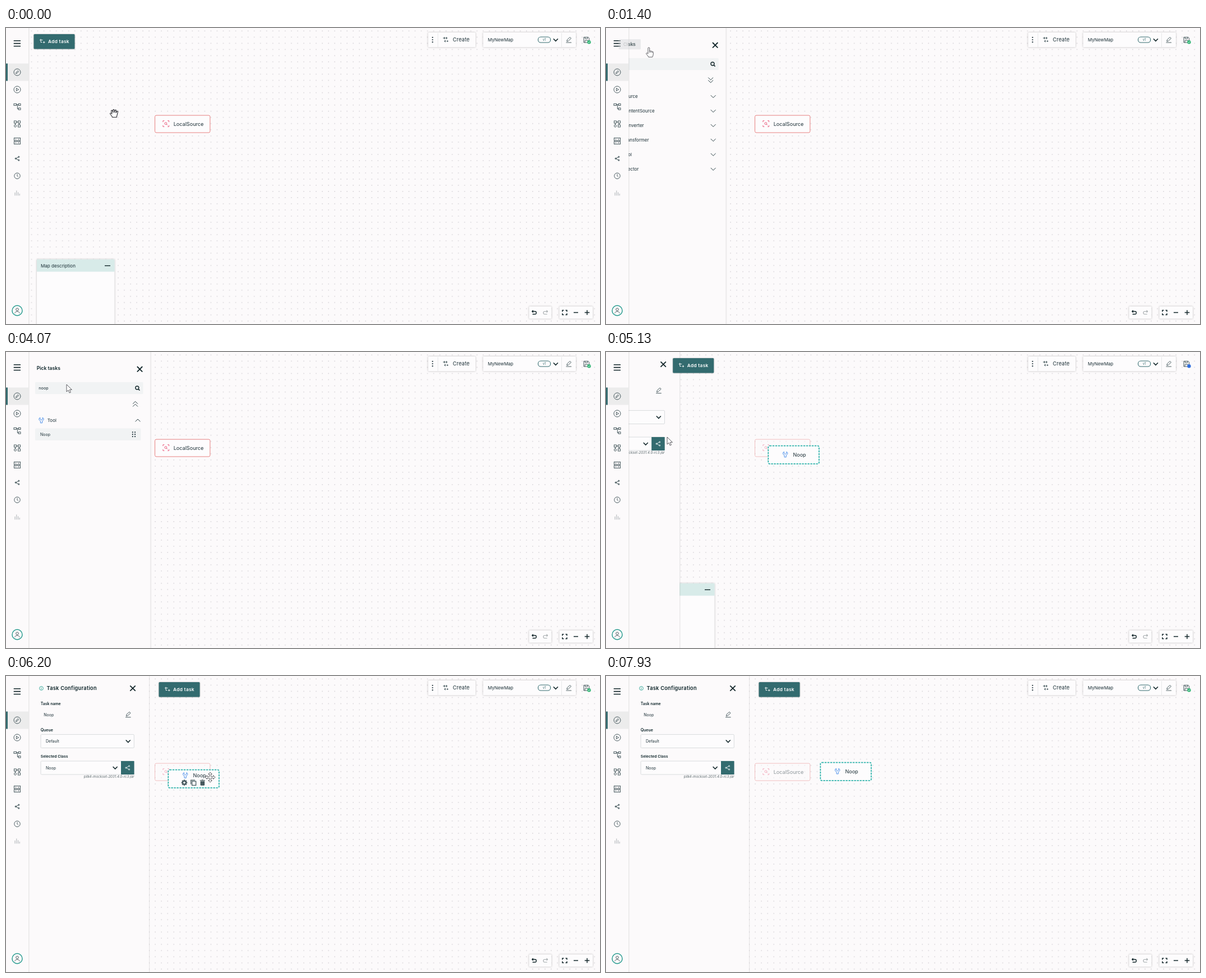
Animation, 1059 px wide and 529 px high, one loop 8000 ms. Source, as an HTML page:

```html
<!DOCTYPE html>
<html lang="en">
<head>
<meta charset="utf-8">
<title>Map editor</title>
<style>
html,body{margin:0;width:100%;height:100%;overflow:hidden;background:#fcfafb}
svg{display:block;width:100%;height:100%}
text{font-family:Inter,"Open Sans",sans-serif;fill:#1b2f36;white-space:pre}
.b{font-weight:600;fill:#0d2429}
.w{fill:#fff}
.l{fill:none;stroke:#2b4046;stroke-width:.85}
.k{fill:none;stroke:#12262a;stroke-width:1.6}
.card{fill:#fdfcfd;filter:drop-shadow(0 .8px 1.4px rgba(0,0,0,.28))}
.side{fill:#fcfafb;filter:drop-shadow(.6px 0 1px rgba(0,0,0,.25))}
.cur{fill:#fff;stroke:#2a2a30;stroke-width:.75;stroke-linejoin:round}
</style>
</head>
<body>
<svg id="stage" viewBox="0 0 1059 529" xmlns="http://www.w3.org/2000/svg"></svg>
<script>
const stage = document.getElementById('stage');
const $ = id => document.getElementById(id);
const path = (d, cls = 'l', extra = '') => `<path class="${cls}" d="${d}" ${extra}/>`;
const label = (x, y, size, s, cls = '', extra = '') =>
  `<text x="${x}" y="${y}" font-size="${size}" class="${cls}" ${extra}>${s}</text>`;
const rect = (x, y, w, h, extra = '') => `<rect x="${x}" y="${y}" width="${w}" height="${h}" ${extra}/>`;
const circle = (x, y, r, extra = 'class="l"') => `<circle cx="${x}" cy="${y}" r="${r}" ${extra}/>`;
const at = (x, y, body, extra = '') => `<g transform="translate(${x} ${y})" ${extra}>${body}</g>`;
const group = (id, body) => `<g id="${id}">${body}</g>`;
const dots = (x, ys, r = 1.1) => ys.map(y => circle(x, y, r, 'fill="#1b2f36"')).join('');
const ink = (color, w = .9) => `style="stroke:${color};stroke-width:${w}"`;
const fill = (color, extra = '') => `fill="${color}" ${extra}`;

const pencil = path('M-3.6 3 -3-.1 2-4.6 4-2.5-1 2.2ZM-5 5H4.6', 'l', ink('#2b4046', .85));
const cross = path('M-4.7-4.7 4.7 4.7M4.7-4.7-4.7 4.7', 'k', 'style="stroke-width:1.8"');
const chevron = path('M-4-2 0 2 4-2', 'k');
const thin = dir => path(`M-4.4 ${-2.1 * dir} 0 ${2.3 * dir} 4.4 ${-2.1 * dir}`, 'l', ink('#20363c', .95));
const share = color => path('M2.6-3-2.6 0 2.6 3', 'l', ink(color)) +
  [[2.8, -3], [-2.8, 0], [2.8, 3]].map(p => circle(...p, 1.1, fill('none', ink(color)))).join('');
const addIcon = color => path('M-4.5-2.5H1M-2.5-4.5V1.5H0M1.5 1.5H5M3.2-.3V3.4', 'l', ink(color));

const icons = {
  Source: path('M-5.3-2.8V-5.3H-2.8M2.8-5.3H5.3V-2.8M5.3 2.8V5.3H2.8M-2.8 5.3H-5.3V2.8M1.1 1.1 2.8 2.8', 'l', ink('#e8486f')) +
    circle(-.4, -.4, 1.9, `fill="none" ${ink('#e8486f')}`),
  ContentSource: path('M-5-3V5H4.5V1.5M-3 2C-2-1.5 0-2.5 4.6-2.6M2.6-4.8 4.8-2.6 2.6-.5', 'l', ink('#ee6585')),
  Converter: path('M-4.6-4.6H.6V-1.4H-1.2V4.6H-4.6Z', '', fill('#d9822b')) + path('M.2.2H2.6L4.2 1.8V4.6H.2Z', 'l', ink('#d9a06a')),
  Transformer: path('M-4.6-4.8H.8V-2.2L-1.6.4V4.6H-4.6Z', '', fill('#2f7f93')) + circle(1.6, 2, 2.6, `fill="none" ${ink('#6fa5b4')}`),
  Tool: path('M-2.2-4.8C-5-3.5-5 0-1.6 1.2V4.8H1.6V1.2C5 0 5-3.5 2.2-4.8V-1.8L0-.6-2.2-1.8Z', 'l', ink('#3d86e8')),
  Injector: path('M-5-2.5V5H5V-.5M-4.2-4.8C0-4.8 1.6-2.5 1.6 2M-.7-.1 1.6 2.3 3.8-.1', 'l', ink('#2fb574', 1))
};

function sidebar() {
  const box = (x, y, w = 4, h = w) => rect(x, y, w, h, 'class="l"');
  return rect(-3, -3, 43.3, 535, 'class="side"') +
    rect(0, 63.5, 40, 31, fill('#ececec')) + rect(0, 63.5, 3, 31, fill('#336b6f')) +
    path('M13.7 22.7H26M13.7 27.6H26M13.7 32.5H26', 'k') +
    at(20, 79, circle(0, 0, 6) + path('M-2.5 2.5-2 .6 1.4-2.7 2.7-1.4-.6 2Z')) +
    at(20, 110, circle(0, 0, 6) + path('M-1.6-2.6V2.6L2.6 0Z')) +
    at(20, 140.5, box(-6, -5.2, 4.6, 3.2) + box(2.2, -5.2, 3.8, 3.2) + box(2.2, 2.4, 3.8, 3.2) + path('M-1.4-3.6H2.2M.4-3.6V4H2.2')) +
    at(20, 171.5, box(-5.5, -5.5) + box(1.5, -5.5) + box(1.5, 1.5) + circle(-3.5, 3.5, 2) + path('M-1.5-3.5H1.5M3.5-1.5V1.5M-3.5-1.5V1.5')) +
    at(20, 202, box(-5.6, -5.5, 11.2, 4.7) + box(-5.6, .8, 11.2, 4.7) + path('M-3.5-3.1H-1.5M1-3.1H3.5M-3.5 3.1H-1.5M1 3.1H3.5')) +
    at(20, 233.3, share('#2b4046')) +
    at(20, 264.3, circle(0, 0, 5.2) + path('M0-3.2V0L1.8 2')) +
    at(20, 295, path('M-4 4.5V-1M-1.2 4.5V-4.5M1.6 4.5V-1.5M4.2 4.5V1', 'l', ink('#a3abae'))) +
    at(20, 505, circle(0, 0, 9, fill('#fcfafb', ink('#23998c', 1.4))) + circle(0, -2, 2.3) + path('M-4.2 4.8C-4 .6 4 .6 4.2 4.8'));
}

function toolbars() {
  const card = (x, y, w, h) => rect(x, y, w, h, 'rx="1.5" class="card"');
  const rule = x => path(`M${x} 9V34`, 'l', ink('#e3e4e5', .8));
  return card(752.5, 8, 84.5, 26.3) + dots(760.5, [16.8, 21, 25.2]) + rule(770) +
    at(783.5, 21, path('M-4.5-3H3.5M-2-5V-1M2-5V-1M-2.5 2.5H.5M-.5.2V4.5M2 2.5H5M3.5 1V4')) +
    label(796.5, 24.4, 9.2, 'Create', '', 'letter-spacing=".2"') +
    card(850.5, 8, 165.5, 26.3) + label(859, 24, 8, 'MyNewMap') +
    rect(948.7, 16, 22, 10, `rx="4.6" fill="#fdfcfd" ${ink('#336b6f', 1.1)}`) +
    label(959.7, 23, 5.6, 'v1', '', 'text-anchor="middle" style="fill:#336b6f"') +
    at(980, 21.3, chevron) + rule(990.5) + at(1003.5, 21, pencil) +
    at(1034.8, 21.2, path('M-4.8-4.8H3L4.8-3V4.8H-4.8ZM-2.5-4.8V-2H2V-4.8M-2.7 4.8V1H2.7V4.8')) +
    circle(1039.5, 25.2, 3.2, 'id="badge"') + path('M1037.9 25.2 1039.1 26.4 1041.1 24.1', 'l', `id="check" ${ink('#fff')}`) +
    card(932.5, 497.5, 40, 22) + card(986.5, 497.5, 59.5, 22) +
    at(941.5, 508.5, path('M-1.6-4-3.6-2-1.6 0M-3.4-2H1.5A2.5 2.5 0 0 1 1.5 3H-2.8', 'k', 'style="stroke-width:1.3"')) +
    at(962, 508.5, path('M1.6-4 3.6-2 1.6 0M3.4-2H-1.5A2.5 2.5 0 0 0-1.5 3H2.8', 'l', ink('#a6acaf', 1.1))) +
    at(996, 508.5, path('M-4-1.5V-4H-1.5M1.5-4H4V-1.5M4 1.5V4H1.5M-1.5 4H-4V1.5', 'k', 'style="stroke-width:1.5"')) +
    path('M1012 508.5H1020M1031.7 508.5H1040.3M1036 504.2V512.8', 'k', 'style="stroke-width:1.5"');
}

const mapNote = rect(55, 413.5, 138.5, 125, 'class="card"') + rect(55, 413.5, 138.5, 22, fill('#d8ebe9')) +
  label(62, 427.7, 8.1, 'Map description') + path('M176 424.8H186', 'k', 'style="stroke-width:1.4"');

const addTask = rect(0, 0, 73, 26.5, 'rx="1.5" fill="#336b6f" style="filter:drop-shadow(0 .8px 1px rgba(0,0,0,.3))"') +
  at(15, 13, addIcon('#fff')) + label(25.6, 16.2, 8.2, 'Add task', 'b', 'letter-spacing=".35" style="fill:#fff"');

const localNode = rect(265.5, 156.1, 98.3, 30.9, `rx="2.5" fill="#fdfcfd" ${ink('#e57373', .9)}`) +
  at(285.2, 171, icons.Source) + label(298.7, 175, 9.1, 'LocalSource');

const gear = [0, 45, 90, 135].map(a => rect(-1.1, -5.3, 2.2, 10.6, `fill="#46595d" transform="rotate(${a})"`)).join('') +
  circle(0, 0, 2.9, fill('#fff', ink('#46595d', 2.2)));
const nodeTools = at(28.6, 23, gear) +
  at(44.8, 23, path('M-4.5 3V-4.5H3M-2.5-2.5H4.5V4.7H-2.5Z', 'l', ink('#46595d', 1.3))) +
  at(61, 23, path('M-4.5-4.7H-1.5L-1-5.4H1L1.5-4.7H4.5V-3.3H-4.5ZM-3.8-2.5H3.8V4.2L3 5.2H-3L-3.8 4.2Z', '', fill('#46595d')));
const noopNode = rect(0, 0, 90.5, 32.3, `rx="2.5" fill="#fdfcfd" ${ink('#2fb3ab', 1.8)} stroke-dasharray="3.4 1.6"`) +
  group('face', at(30.3, 15.5, icons.Tool) + label(44.2, 19.6, 9, 'Noop')) + group('tools', nodeTools);

const pickPanel = rect(30, -3, 227.5, 535, 'class="side"') +
  label(54.7, 32, 8.6, 'Pick tasks', 'b') + at(238.5, 30.7, cross) +
  rect(52, 53.7, 192.5, 21.5, 'rx="1.5" fill="#f1f3f4"') +
  circle(233.8, 64, 3, 'class="k" style="stroke-width:1.4"') + path('M236 66.2 238.4 68.6', 'k') +
  '<text id="query" x="58.3" y="67.2" font-size="7.3"></text>' +
  rect(0, 60, .8, 9, 'id="caret" fill="#12262a"') + group('list', '');

const select = (y, s) => rect(62, y, 166.3, 24, `rx="1.5" fill="#fdfcfd" ${ink('#d9dcde', 1)}`) + label(71, y + 14.6, 7, s);
const configPanel = rect(-190, -3, 445, 535, 'class="side"') +
  circle(63, 22, 3.4, `fill="none" ${ink('#2fa596')}`) + path('M63 21.4V24M63 19.8V20.6', 'l', ink('#2fa596')) +
  label(72.5, 25.3, 9.2, 'Task Configuration', 'b', 'letter-spacing=".28"') + at(226, 22, cross) +
  label(61.8, 52.2, 6.9, 'Task name', 'b') + label(67.3, 72, 7, 'Noop') + at(218, 68.7, pencil) +
  label(61.8, 98.6, 6.9, 'Queue', 'b') + select(104.5, 'Default') + at(217.7, 116.5, chevron) +
  label(61.8, 145.8, 6.8, 'Selected Class', 'b') + select(152, 'Noop') + at(194.6, 164, chevron) +
  rect(205, 152, 23.5, 24, fill('#336b6f')) + at(216.7, 164, share('#e8f0f0')) +
  label(228.5, 182.3, 6.1, 'pilk4-mockset-2031.4.0-rc3.jar', '', 'text-anchor="end" font-style="italic" style="fill:#5c6a6e"');

const tooltip = rect(22.5, 20, 39.5, 18.3, 'rx="1.5" fill="#d6d8da"') + label(31, 32, 7.6, 'Close', '', 'style="fill:#6a7276"');

const cursors = {
  arrow: path('M0 0V13L3.1 10.2 5.2 15 7.4 14 5.3 9.4H9.4Z', 'cur'),
  hand: path('M-1.6 10V1.2A1.4 1.4 0 0 1 1.2 1.2V6.2Q2.4 5 3.6 6.6 5 5.6 6 7.2 7.8 6.8 7.8 8.6V11.5Q7.6 14 6.2 17H-.6Q-1.8 14.5-4.6 11.4C-5.4 9.6-3.6 8.8-1.6 11ZM1.2 6.2V9M3.6 6.8V9.2M6 7.4V9.4', 'cur'),
  grab: path('M-2.6 7Q-4.4 4-6.8 1C-7.4-.8-5.2-1.2-3.6.8L-5-4C-5-5.8-3-5.8-2.6-4.2L-1.6-1.4-1.8-5.6C-1.6-7.4.4-7.2.6-5.6L.9-1.6 2-5.2C2.6-6.8 4.4-6.2 4-4.4L3.5-1 5.2-3.4C6.2-4.6 7.6-3.6 6.8-2L5.6 3Q4.8 5 4.8 7Z', 'cur', 'style="stroke-width:1.1"'),
  move: path('M0-9 3.3-5.6H1.3V-1.3H5.6V-3.3L9 0 5.6 3.3V1.3H1.3V5.6H3.3L0 9-3.3 5.6H-1.3V1.3H-5.6V3.3L-9 0-5.6-3.3V-1.3H-1.3V-5.6H-3.3Z', 'cur')
};

stage.innerHTML =
  `<defs><pattern id="grid" x="40" y="-.28" width="11.03" height="11.03" patternUnits="userSpaceOnUse">
    ${circle(5.52, 5.52, .8, fill('#cbc8cd'))}</pattern></defs>` +
  rect(0, 0, 1059, 529, fill('#fcfafb')) + rect(40, 0, 1019, 529, fill('url(#grid)')) +
  group('local', localNode) + group('noop', noopNode) + mapNote +
  group('pick', pickPanel) + group('config', configPanel) + group('add', addTask) +
  sidebar() + toolbars() + group('tip', tooltip) +
  group('cursor', Object.entries(cursors).map(([k, v]) => group(k, v)).join(''));

// Task list for each stage of the search
const names = Object.keys(icons);
const results = {
  '': names.map(n => [n]),
  n: [['Source', 'JsonSource', 'FolderScan'], ['ContentSource', 'ContentReader'], ['Converter', 'ImageConverter', 'JoinPages'],
    ['Transformer', 'RenameField'], ['Tool', 'Counter', 'Noop'], ['Injector', 'IndexInjector']],
  no: [['Converter', 'AnnotationMerge'], ['Tool', 'Noop']],
  noo: [['Tool', 'Noop']]
};
results.noop = results.noo;

function listMarkup(q) {
  const dir = q ? -1 : 1, step = q ? 25.5 : 25.95;
  let y = 122, out = at(230.5, 93, at(0, -2.4, thin(dir)) + at(0, 2.4, thin(dir)));
  for (const [name, ...items] of results[q]) {
    out += at(63, y, icons[name]) + label(73.8, y + 2.9, 8, name) + at(235, y + .3, thin(dir));
    y += step;
    for (const item of items) {
      out += rect(52, y - 11, 188.5, 21.5, 'rx="1.5" fill="#f1f3f4"') + label(61, y + 2.2, 7, item);
      for (const x of [225.8, 230]) out += dots(x, [y - 4.2, y - .3, y + 3.6]);
      y += step;
    }
  }
  return out;
}

const clamp = x => Math.max(0, Math.min(1, x));
const easeOut = (t, start, dur) => 1 - (1 - clamp((t - start) / dur)) ** 3;
const between = (t, a, b) => t >= a && t < b;
const show = (id, on) => $(id).setAttribute('visibility', on ? 'visible' : 'hidden');
const move = (id, x, y) => $(id).setAttribute('transform', `translate(${x.toFixed(2)} ${y.toFixed(2)})`);

// time, x, y of the pointer's hot spot
const route = [
  [70, 192.5, 152.5], [560, 84, 32], [870, 66, 15], [1270, 75, 32], [1400, 76.5, 35], [1730, 84, 43], [2000, 108, 58],
  [4270, 108, 58], [4700, 121, 154], [5000, 109, 152], [5130, 109, 152], [5900, 352, 180], [6130, 364, 181],
  [6270, 364, 181], [6800, 441, 165], [7000, 457, 168], [7200, 457, 168], [7500, 464, 205], [7860, 466, 206]
];
function pointer(t) {
  const i = route.findIndex(k => k[0] > t);
  if (i === 0) return route[0].slice(1);
  if (i < 0) return route[route.length - 1].slice(1);
  const [a, b] = [route[i - 1], route[i]];
  const p = (t - a[0]) / (b[0] - a[0]), e = p * p * (3 - 2 * p);
  return [a[1] + (b[1] - a[1]) * e, a[2] + (b[2] - a[2]) * e];
}
function cursorKind(t, x, y) {
  if (t < 1270) return x < 123 && y < 38 ? 'hand' : 'grab';
  if (t < 1780) return 'hand';
  if (t < 5130) return y > 136 ? 'hand' : 'arrow';
  if (x < 255) return 'arrow';
  return x > 289 && y < 187 ? 'move' : 'grab';
}

let lastQuery = null;
function draw(t) {
  const [cx, cy] = pointer(t), kind = cursorKind(t, cx, cy);
  const placed = t >= 5130;

  move('cursor', cx, cy);
  for (const k in cursors) show(k, k === kind && t < 7880);

  show('pick', between(t, 1270, 5130));
  move('pick', -217 * (1 - easeOut(t, 1270, 317)), 0);
  $('tip').setAttribute('opacity', between(t, 1270, 1600) ? clamp(Math.min((t - 1270) / 100, (1600 - t) / 160)) * .45 : 0);

  const q = 'noop'.slice(0, [2870, 3200, 3330, 3470].filter(k => t >= k).length);
  if (q !== lastQuery) {
    lastQuery = q;
    $('list').innerHTML = listMarkup(q);
    $('query').textContent = q || 'Search';
    $('query').style.fill = q ? '#1b2f36' : '#7d878b';
  }
  $('caret').setAttribute('x', 58.3 + 4.35 * q.length);
  show('caret', between(t, 1600, 1830) || between(t, 2330, 4070) || between(t, 4570, 5000));

  show('config', placed);
  move('config', -214 * (1 - easeOut(t, 5081, 300)), 0);
  show('add', t < 1270 || placed);
  move('add', 49.5 + (placed ? 223 * easeOut(t, 5084, 400) : 0), 11);

  $('local').setAttribute('opacity', placed ? .48 : 1);
  const [nx, ny] = pointer(Math.max(6270, Math.min(7000, t)));
  const hover = placed && kind === 'move';
  show('noop', placed);
  move('noop', 289.3 + nx - 364, 167.6 + ny - 181);
  move('face', 0, hover ? -5.7 : 0);
  $('tools').setAttribute('opacity', hover ? 1 : 0);

  const saving = between(t, 5130, 5700) || between(t, 7200, 7800);
  $('badge').setAttribute('fill', saving ? '#2f6fe0' : '#2fb574');
  show('check', !saving);
}

const begin = performance.now();
function tick() {
  draw((performance.now() - begin) % 8000);
  requestAnimationFrame(tick);
}
tick();
</script>
</body>
</html>
```
